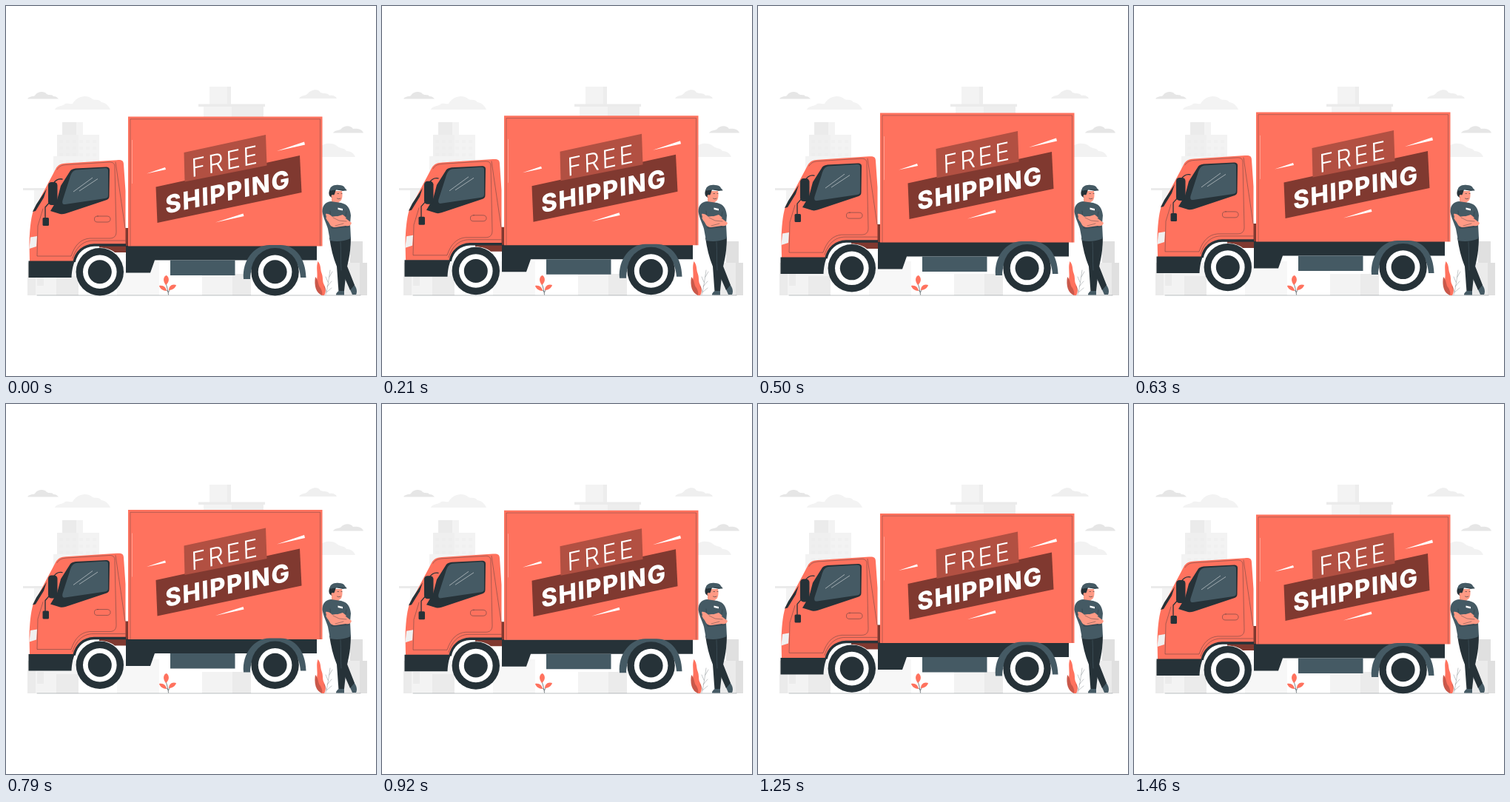
Animation of 500x500 px, one loop 1.5 s. Source, as an HTML page:

```html
<!DOCTYPE html>
<html lang="en">
<head>
<meta charset="utf-8">
<title>Free shipping</title>
<style>
  html, body { margin: 0; width: 100%; height: 100%; overflow: hidden; background: #fff; }
  svg { display: block; width: 100%; height: 100%; }
  .dark { fill: #263238; }
  .slate { fill: #455a64; }
  .coral { fill: #ff725e; }
  .skin { fill: #ff9a85; }
  .line { fill: none; stroke: #263238; stroke-width: .6; stroke-linecap: round; stroke-linejoin: round; }
  .white { fill: #fff; }
  text { font-family: Inter, sans-serif; fill: #fff; }
</style>
</head>
<body>
<svg viewBox="0 0 500 500">
  <defs>
    <g id="wheel">
      <circle class="dark" r="32.2"/>
      <circle class="white" r="22.8"/>
      <circle class="dark" r="16"/>
    </g>
  </defs>

  <g id="city">
    <g fill="#f3f3f3">
      <path d="M76 157H104V174H76Z"/>
      <path d="M69 174H126V250H64V203H69Z"/>
      <path d="M38 249H70V391H38Z"/>
      <path d="M275 109H304V133H275Z"/>
      <path d="M267 136H348V160H267Z"/>
      <path d="M29 347H98V391H29Z"/>
      <path d="M265 362H331V391H265Z"/>
    </g>
    <path fill="#f7f7f7" d="M150 345H207V391H150Z"/>
    <g fill="#ebebeb">
      <path d="M76 157H95V174H76Z"/>
      <path d="M69 174H98V203H69Z" opacity=".5"/>
      <path d="M260 132.500H350V136H260Z"/>
      <path d="M299 109H304V133H299ZM305 136H348V150H305Z" opacity=".7"/>
      <path d="M23 246H62V249H23Z"/>
      <path d="M29 347H40V391H29ZM68 365H98V391H68Z"/>
      <path d="M306 362H331V391H306Z"/>
      <path d="M448 347H488V391H448Z"/>
      <path d="M42 362H51V378H42Z"/>
    </g>
    <path fill="#e0e0e0" d="M465 318H482V347H465ZM478 347H488V391H478Z"/>
    <g id="panes" fill="#e8e8e8"></g>
  </g>

  <g id="clouds">
    <path fill="#e6e6e6" d="M29 125.500C32 121 37 123 39 121C42 116 51 114 55 119C58 121 62 119 64 122C67 122 69 123 71 125.500Z"/>
    <path fill="#f3f3f3" d="M66 140C69 134 77 136 80 132C84 131 87 133 90 132C96 121 110 119 117 126C121 128 125 125 129 130C135 131 139 135 141 140Z"/>
    <path fill="#efefef" d="M396 125C399 120 404 122 407 119C411 114 421 110 425 117C430 119 435 117 437 121C442 120 446 122 447 125Z"/>
    <path fill="#e6e6e6" d="M442 171.500C445 167 450 169 453 166C457 161 466 161 469 166C474 165 481 166 483 171.500Z"/>
    <path fill="#f2f2f2" d="M424 204V191C429 185 441 184 447 189C451 193 457 191 460 196C466 196 470 199 472 204Z"/>
  </g>

  <path class="line" d="M42 391H479" opacity=".5"/>

  <g id="plants">
    <path class="line" d="M219.500 390C219 385 218 381 216 375M219 386C217 384 215 383 213 382M219.500 387C221 383 223 381 226 379"/>
    <g class="coral">
      <path d="M216 377C211 371 213 365 217 364C221 367 221 373 216 377Z"/>
      <path d="M217 385C212 385 208 382 207 378C213 377 216 380 217 385Z"/>
      <path d="M220 384C220 379 224 375 230 377C229 381 225 384 220 384Z"/>
    </g>
    <path class="coral" d="M427 391C422 383 419 374 420.500 366C421 359 419 352 421.500 345C426 350 424.500 356 426.500 361C429 367 427 372 430 377C433 383 432 388 430 391Z"/>
    <path fill="#c9584a" d="M427 391C419 388 416 378 418 366C423 371 421 377 425 381C427 385 428 388 427 391Z"/>
    <path class="line" opacity=".45" d="M432 390C435 380 436 370 438 357M433 386L430 379M434 379L440 372M435 373L432 366M437 366L441 359M433 387L440 381"/>
  </g>

  <g id="truck">
    <path fill="#803930" d="M126 323H157V300H166V333H147C142 329 135 326.500 126 326.500Z"/>
    <path class="dark" d="M162 324H420V343.500H201L195 360.500H162Z"/>
    <path class="slate" d="M222 343.500H309.500V364H222Z"/>

    <path class="coral" d="M165 149.500H427.500V324.500H165Z"/>
    <path class="line" d="M168 324V152.800H424.500V324" opacity=".55"/>
    <path d="M170.500 181V240" stroke="#fff" stroke-width=".6" opacity=".5"/>

    <path fill="#803930" d="M202.500 244.500L397 202L399.500 252L204.500 293Z"/>
    <path fill="#b25042" d="M240.500 198L351 174L352.500 215.500L241.500 237.500Z"/>
    <text font-size="34" font-weight="300" letter-spacing="3.200" transform="matrix(.98 -.208 .03 1 250.500 231.500)">FREE</text>
    <text font-size="33.500" font-weight="800" letter-spacing="1.500" transform="matrix(.98 -.208 .03 1 215.500 281)">SHIPPING</text>
    <g class="white">
      <path d="M190 226.500L215 218L216 221Z"/>
      <path d="M366 196L403 183.500L404 187.500Z"/>
      <path d="M283 292.500L320.500 280.500L321.500 284Z"/>
    </g>

    <path class="slate" d="M321 369C319 344 335 323 356 323H371C391 323 405 341 405.500 367H398C397 347 385 331 367 331H358C341 331 331 348 330 369Z"/>

    <path class="coral" d="M32 345L31.500 320C32 305 33 289 37 276C46 261 56 241 67 220.500C70 214.500 75 213 81 212.600L150 208.200C156 207.700 159 209 159 214L161.500 250V322H118C105 322 97 330 93 345Z"/>
    <path fill="none" stroke="#263238" stroke-width="3.500" d="M92 346C95 332 105 323.500 119 323H162"/>
    <path class="line" d="M69 221C72 216 76 215 82 214.500L140 211C145 211 147 213 147 218L149 305C149 311 146 314 140 314H113C101 315 93 323 88 338H42L43 297L50 274M148 211L161 300M90 341C95 325 105 317 118 317H161" opacity=".65"/>

    <path class="dark" d="M87 222.500C89 220.500 91 220 94 219.500L135 217.500C138 217.500 140 218.500 140 221.500L139.500 257C139.500 260 138 261 136 262L85 279C81 280.500 77 282 73 281L60 277L69 262L74 243Z"/>
    <path class="slate" d="M95 221.500L134 219C137 219 138 220 138 222.500V256C138 258.500 137 259.500 134 260L80 268C77 268.500 75 267 77 261L86 233C88 226 90 222.500 95 221.500Z"/>
    <path d="M91 251L117 232M99 250L124 233.500" stroke="#fff" stroke-width=".7" opacity=".7"/>
    <path class="dark" d="M36 278L41 268L55 247L51 259L40 277Z"/>
    <path class="line" style="stroke-width:1.300" d="M64 240C67 235 71 233 76 234M60 264L53 272V288"/>
    <rect class="dark" x="57" y="238" width="12.500" height="31" rx="4.500"/>
    <rect class="dark" x="49.500" y="286" width="8.500" height="11" rx="1.500"/>
    <path class="line" d="M124 284H136C140 284 141 286 141 288S140 292 136 292H124C120 292 119.500 290 119.500 288S120 284 124 284Z" opacity=".75"/>
    <path fill="#f0f0f0" d="M33 312.500L42 311L41 325L31.500 328Z"/>
    <path class="dark" d="M30.500 344.500H93C90 352 89 358 88.500 367H30.500Z"/>
    <use href="#wheel" x="126.800" y="359.200"/>
    <use href="#wheel" x="363.600" y="359.200"/>
  </g>

  <g id="man">
    <path class="slate" d="M464 381L470 376C474 381 475 386 473 390H468Z"/>
    <path class="slate" d="M446 390.500C446 387 449 386 452 383H457V390.500Z"/>
    <path class="dark" d="M446 312L466 312C466 326 462 340 460 349L471 377L465 384L453 357Z"/>
    <path class="dark" d="M437 313L465 313C467 328 463 343 460 357L457 385H449.500L447 352C442 340 439 327 437 313Z"/>
    <path class="line" style="stroke:#455a64" d="M452 319C453 332 452 344 453 357"/>
    <path class="skin" d="M440 256L449 259L450 269L440 268Z"/>
    <path class="slate" d="M439 264C431 265 427.500 270 427.500 278C429 287 433 294 435 301L438 317C447 319 457 318 466 314L465 294L466 283C465 273 461 268 453 266Z"/>
    <path class="dark" opacity=".35" d="M437 292L462 295L464 299L440 301Z"/>
    <path class="line" opacity=".7" d="M438 277L439 288M460 278L458 290"/>
    <path class="skin" d="M432 286L446 284L459 287L467 293C466 297 463 298 459 297L445 299C441 299 438 297 437 294Z"/>
    <path class="skin" d="M432 281C436 280 439 283 442 286L455 282L460 286L446 294L434 290Z"/>
    <path class="line" style="stroke-width:.4" d="M442 286L450 290L460 291M445 297L456 294"/>
    <path class="white" d="M448.500 272.500L455 274V276.500L448.500 275Z"/>
    <path class="skin" d="M441 250H454C455 256 455 263 449.500 265C443 264 440 258 441 250Z"/>
    <path class="dark" d="M437.500 248L446 248L444 254L441 259C437 258 435 254 437.500 248Z"/>
    <circle class="skin" cx="441.500" cy="257" r="2"/>
    <path class="slate" d="M437.500 250C437 244 443 241 450 242C454 242 457 243.500 458 246L460.500 249L455 250C449 248 443 248 437.500 250Z"/>
    <path class="line" d="M449 248L460 249M448 253.500H449.500M453 253.500H454M447.500 260C449 261 450.500 261 452 260"/>
  </g>
</svg>
<script>
  const LOOP = 1500, LIFT = 6.5;
  const truck = document.getElementById('truck');

  // rows of tower windows
  let panes = '';
  for (let row = 0; row < 4; row++)
    for (let col = 0; col < 6; col++)
      panes += `M${72 + col * 9} ${181 + row * 9}h5v4h-5z`;
  document.getElementById('panes').innerHTML = `<path d="${panes}" opacity=".3"/>`;

  function draw(now) {
    const phase = (now % LOOP) / LOOP * 2 * Math.PI;
    const y = -LIFT * (1 - Math.cos(phase)) / 2;
    truck.setAttribute('transform', `translate(0 ${y.toFixed(3)})`);
  }

  const start = performance.now();
  function tick() {
    draw(performance.now() - start);
    requestAnimationFrame(tick);
  }
  tick();
</script>
</body>
</html>
```
